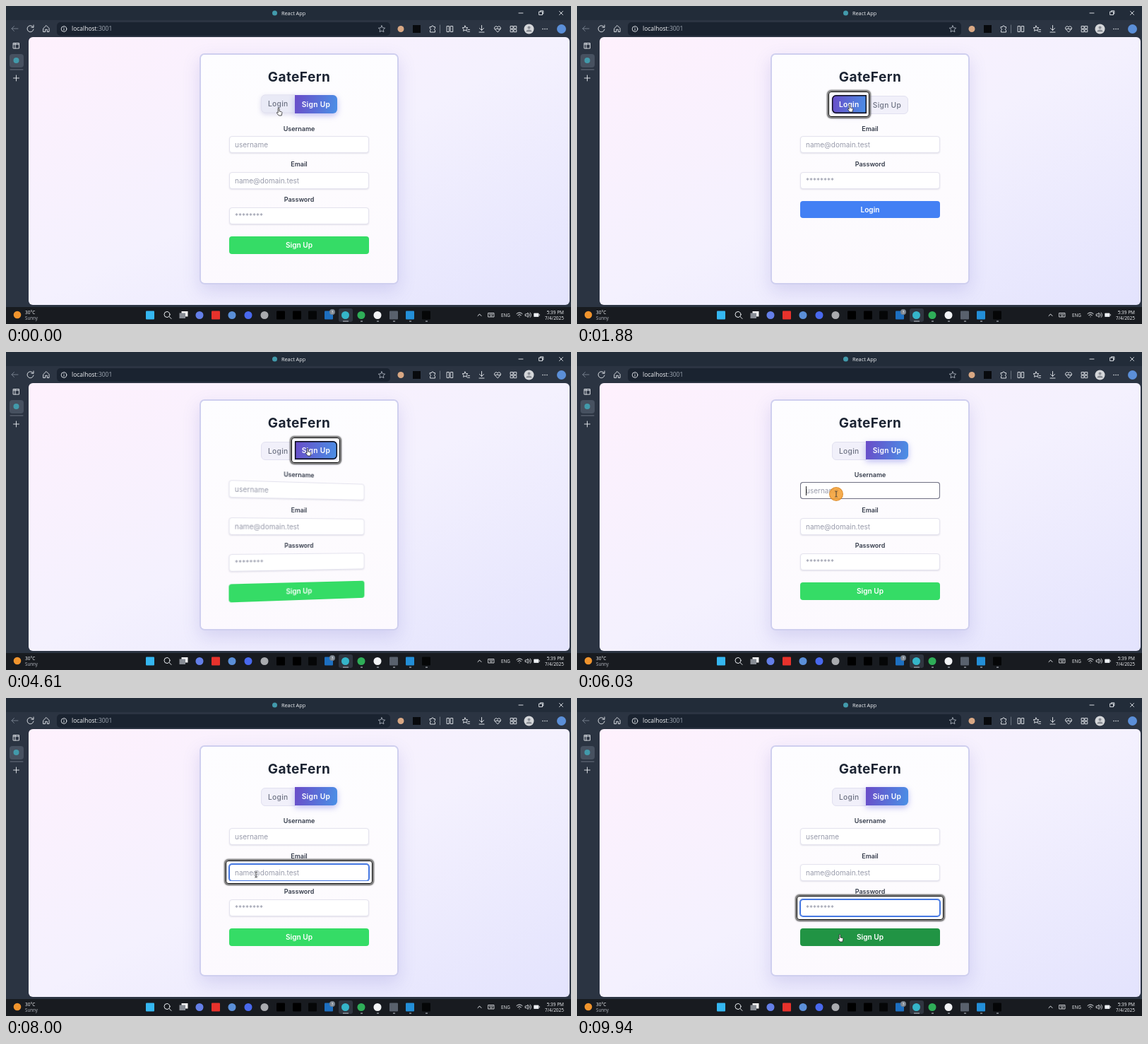
These frames come from a looping animation (800 px wide and 450 px high, 10000 ms). An HTML page:

```html
<!DOCTYPE html>
<html lang="en">
<head>
<meta charset="utf-8">
<title>React App</title>
<style>
html, body { margin: 0; width: 100%; height: 100%; overflow: hidden; background: #2b3442; }
#stage { position: relative; width: 800px; height: 450px; overflow: hidden; font-family: Inter, sans-serif; }
#stage div, #stage svg { position: absolute; box-sizing: border-box; }
#page { left: 32px; top: 44px; width: 766px; height: 379px; border-radius: 6px;
  background: linear-gradient(to bottom right, #fef1fd, #f4f1fe 50%, #e3e3fd); }
#card { left: 274px; top: 67px; width: 282px; height: 327px; border: 2.5px solid #cfcfef; border-radius: 7px;
  background: linear-gradient(#fdfdff, #fdfbfe 60%, #fcf9fe); box-shadow: 0 9px 24px rgba(95, 90, 190, .18); }
#title { left: 275px; top: 89px; width: 280px; line-height: 24px; text-align: center;
  font-size: 19px; font-weight: 700; letter-spacing: .45px; color: #1c2433; }
#tabs { isolation: isolate; }
.tab { top: 127px; height: 26px; line-height: 26px; text-align: center; font-size: 10.2px; font-weight: 500;
  letter-spacing: .3px; border: 1px solid #e2e1f0; }
.tab div { inset: -1px; border-radius: inherit; }
.fill { background: linear-gradient(100deg, #6a4cc8, #4a90e6); box-shadow: 0 3px 9px rgba(85, 85, 220, .38); }
.tab .word { line-height: 26px; }
.form { left: 316px; top: 160px; width: 198px; height: 200px; }
.label { width: 198px; line-height: 12px; text-align: center; font-size: 9px; font-weight: 600; color: #343b4a; }
.input { width: 198px; height: 24px; line-height: 22px; padding-left: 7px; border: 1px solid #e4e3ee; border-radius: 4px;
  background: #fff; font-size: 10px; color: #989bab; box-shadow: 0 1px 2px rgba(70, 70, 110, .14); }
.caret { left: 7px; top: 5px; width: 1px; height: 13px; background: #222; }
.send { width: 198px; height: 24.6px; line-height: 24.6px; border-radius: 4px; text-align: center; font-size: 10.1px;
  font-weight: 600; color: #fff; }
#ring { border: 1.6px solid #050505; border-radius: 4px;
  box-shadow: 0 0 0 .8px #aaa, 0 0 2px 2px #444, inset 0 0 0 3px #fff; }
#dot { width: 20px; height: 20px; margin: -10px; border-radius: 50%; background: rgba(244, 158, 48, .85);
  border: 1px solid rgba(205, 120, 20, .6); }
</style>
</head>
<body>
<div id="stage">
  <svg id="chrome" width="800" height="450" viewBox="0 0 800 450" fill="none" stroke-linecap="round" stroke-linejoin="round">
    <path fill="#2b3442" d="M0 0h800v450H0z"/>
    <path fill="#222c39" d="M0 0h800v20H0z"/>
    <path fill="#181b20" d="M0 426h800v24H0z"/>
    <rect x="72" y="23" width="472" height="19" rx="5" fill="#1a2330"/>
    <rect x="5" y="68" width="20" height="19" rx="4" fill="#475160"/>
    <path stroke="#7b8491" stroke-width=".8" d="M6 90h18M614.500 27v11"/>
    <g fill="#429aab"><circle cx="380.500" cy="10" r="3.500"/><circle cx="14.500" cy="77" r="4"/></g>
    <g stroke="#e8ebf0" stroke-width=".9">
      <path d="M726 10h6M755 8h4.500v4.500H755zM756.500 8V6.800h4.300V11h-1.300M783.500 7.500l5 5m0-5l-5 5"/>
      <path stroke="#7b8592" d="M17 32H8m3.500-3.500L8 32l3.500 3.500"/>
      <path d="M38.500 30a4.500 4.500 0 1 0 .5 3M39 27v3.200h-3.200"/>
      <path d="M53 31.500l4-4 4 4V36.500h-2.700v-3.200h-2.600v3.200H53z"/>
      <circle cx="82" cy="32.500" r="3.800"/><path d="M82 32v2.300m0-4v.1"/>
      <path stroke="#abb2bd" d="M532 27.800l1.400 3 3.300.4-2.400 2.200.6 3.300-2.900-1.600-2.900 1.600.6-3.300-2.400-2.200 3.300-.4z"/>
      <path d="M600.500 29.500h2a1.500 1.500 0 0 1 3 0h2v2.200a1.500 1.500 0 0 0 0 2.800V37h-7v-2.500a1.500 1.500 0 0 0 0-2.800z"/>
      <path d="M624.500 28.500h3v8h-3zM629.700 28.500h3v8h-3z"/>
      <path d="M650 28l1.200 2.500 2.700.3-2 1.900.5 2.700-2.400-1.300-2.400 1.300.5-2.700-2-1.900 2.700-.3zM654 33.500h2.500M653.500 36.200h3"/>
      <path d="M673.500 27.500v7m-3-3l3 3 3-3M670 37h7"/>
      <path d="M696 36.800l-4-4a2.500 2.500 0 0 1 4-3 2.500 2.500 0 0 1 4 3zM693 32.500h2l1-1.500 1.200 2.500.8-1h2"/>
      <path d="M714.500 28.500h3.500v3.500h-3.500zM714.500 33.200h3.500v3.500h-3.500zM719.300 33.200h3.500v3.500h-3.500zM719.300 28.500h3.500v3.500h-3.500z"/>
      <path stroke-width="1.500" d="M760 32.500h.1M763 32.500h.1M766 32.500h.1"/>
      <path d="M10.500 52.500h8v7.500h-8zM13 52.500v7.500M10.500 54.300h8M10.500 102h8m-4-4v8"/>
    </g>
    <circle cx="559" cy="32.500" r="4.500" fill="#d9a884"/>
    <rect x="576" y="27" width="11" height="11" fill="#080a0d"/>
    <circle cx="740.500" cy="32.500" r="7" fill="#d5d7da"/>
    <path fill="#8b8f96" d="M736.500 36.500a4 3 0 0 1 8 0z"/><circle cx="740.500" cy="30.500" r="2" fill="#8b8f96"/>
    <circle cx="786.500" cy="32.500" r="6.500" fill="#5b8fd8"/>
    <g font-family="Open Sans, sans-serif" fill="#f2f4f7" font-size="6.500">
      <text x="390" y="12.700" font-size="7.300">React App</text>
      <text x="93" y="35.400" font-size="8.500">localhost<tspan fill="#a2aab5">:3001</tspan></text>
      <text x="27" y="435.500">30°C</text><text x="27" y="443.500" fill="#b8bcc4" font-size="6.200">Sunny</text>
      <text x="701" y="439.800" font-size="6.300">ENG</text>
      <text x="790" y="435.500" text-anchor="end">5:39 PM</text><text x="790" y="443.500" text-anchor="end">7/4/2025</text>
    </g>
    <circle cx="16" cy="437" r="5.300" fill="#f0942d"/>
    <rect x="471" y="428" width="20" height="19" rx="3" fill="#303640"/>
    <g id="apps"></g>
    <g stroke="#eceff3" stroke-width="1">
      <circle cx="228" cy="436.500" r="4"/><path d="M231 439.500l3 3"/>
      <path d="M668 438.500l2.500-2.500 2.500 2.500"/>
      <path stroke-width=".8" d="M683 434.500h8v5.500h-8zM684.500 436.300h5M685.500 438.300h3"/>
      <path d="M723 435.500a5.500 5.500 0 0 1 8 0M724.700 437.500a3.500 3.500 0 0 1 4.600 0M727 439.800v.1"/>
      <path stroke-width=".8" d="M735.500 436h1.500l2-2v6.500l-2-2h-1.500zM740.800 435.500a2.500 2.500 0 0 1 0 3.500M742.200 434a4.500 4.500 0 0 1 0 6.500"/>
      <path fill="#eceff3" stroke-width=".8" d="M748 435h6v4.500h-6zM755.300 436.500v1.500"/>
    </g>
    <path fill="#f1f1f1" d="M248.500 432h9v7.500h-9z"/><path fill="#888d95" d="M245.500 434.500h8.500v7.500h-8.500z"/>
    <circle cx="462" cy="433" r="4" fill="#79838e"/>
    <text x="462" y="435.200" text-anchor="middle" font-size="6" fill="#fff" font-family="Open Sans, sans-serif">3</text>
    <path fill="#a3a8b0" d="M477 445.500h8v1.300h-8zM502 445.500h3v1.300h-3zM525 445.500h3v1.300h-3zM548 445.500h3v1.300h-3zM571 445.500h3v1.300h-3zM594 445.500h3v1.300h-3z"/>
  </svg>
  <div id="page"></div>
  <div id="card"></div>
  <div id="title">GateFern</div>
  <div id="tabs"></div>
  <div id="ring"></div>
  <div id="dot"></div>
  <svg id="cursor" width="16" height="18" viewBox="-8 -9 16 18" fill="#fff" stroke="#222" stroke-width=".8" stroke-linejoin="round">
    <path data-kind="hand" d="M-1.800-5.200c1-.9 1.800-.1 1.800.8V-1l2.800.6c.9.300 1.200.9 1 1.800L3.100 5H-.7L-3.500 1.600c-.5-.9.4-1.500 1.200-.9l.5.5z"/>
    <path data-kind="arrow" d="M-3-5.500v9.200l2.200-2 1.500 3.300 1.500-.7-1.500-3.200h3z"/>
    <path data-kind="beam" fill="none" stroke="#333" stroke-width=".9" d="M-1.700-4h1.200l.5.500.500-.5h1.200M0-3.500v7M-1.700 4h1.200l.5-.5.5.5h1.200"/>
  </svg>
</div>
<script>
const LOOP = 10000;
const $ = id => document.getElementById(id);
const stage = $('stage');
const clamp = v => Math.min(1, Math.max(0, v));
const ramp = (t, start, len) => clamp((t - start) / len);
const smooth = p => p * p * (3 - 2 * p);
const blend = (a, b, p) => `rgb(${a.map((v, i) => Math.round(v + (b[i] - v) * p))})`;

function box(parent, cls, text, style) {
  const el = document.createElement('div');
  el.className = cls;
  el.textContent = text;
  Object.assign(el.style, style);
  return parent.appendChild(el);
}

// Taskbar tiles: x, colour, round
const apps = [[204, '#35b7f1', 0], [274, '#647fe8', 1], [297, '#e7322c', 0], [320, '#5b8fd8', 1],
  [343, '#4969ee', 1], [366, '#a9abaf', 1], [389, '#000', 0], [412, '#000', 0], [434, '#050607', 0],
  [457, '#1d6fc0', 0], [480.5, '#35b5c9', 1], [503, '#2fae58', 1], [526, '#f2f3f5', 1],
  [549, '#59616d', 0], [572, '#238fd8', 0], [595, '#050607', 0]];
$('apps').innerHTML = apps.map(([x, color, round]) => {
  const r = round ? 5.5 : 6;
  return `<rect x="${x - r}" y="${437.5 - r}" width="${2 * r}" height="${2 * r}" rx="${round ? r : 1}" fill="${color}"/>`;
}).join('');

function makeForm(names, word, color) {
  const form = box(stage, 'form', '');
  const hints = { Username: 'username', Email: 'name@domain.test', Password: '********' };
  const inputs = names.map((name, i) => {
    const y = 24.2 + i * 50.4;
    box(form, 'label', name, { top: y - 16.7 + 'px' });
    const el = box(form, 'input', hints[name], { top: y + 'px' });
    return { el, caret: box(el, 'caret', '') };
  });
  const send = box(form, 'send', word, { top: 14.8 + names.length * 50.4 + 'px', background: color });
  return { form, inputs, send };
}
const login = makeForm(['Email', 'Password'], 'Login', '#4380f4');
const signup = makeForm(['Username', 'Email', 'Password'], 'Sign Up', '#35dc66');

function makeTab(word, x, w, radius) {
  const el = box($('tabs'), 'tab', '', { left: x + 'px', width: w + 'px', borderRadius: radius });
  return { el, fill: box(el, 'fill', ''), word: box(el, 'word', word) };
}
const tabs = [makeTab('Login', 361, 48.5, '6px 0 0 6px'), makeTab('Sign Up', 409, 59.8, '0 6px 6px 0')];
['tabs', 'ring', 'dot', 'cursor'].forEach(id => stage.append($(id)));

const TO_LOGIN = 1000, TO_SIGNUP = 3930, HALF = 390;
// Focus changes: time, place and size, tab or field index
const focuses = [
  { at: TO_LOGIN, rect: [361, 126, 48.5, 26], tab: 0 },
  { at: TO_SIGNUP, rect: [409, 126, 59.8, 26], tab: 1 },
  { at: 5990, rect: [316, 184, 198, 24], field: 0 },
  { at: 7490, rect: [316, 234.6, 198, 24], field: 1 },
  { at: 9000, rect: [316, 285, 198, 24], field: 2 }
];
// Pointer path: time, x, y
const path = [[0, 387, 150], [30, 387, 150], [210, 387, 146], [700, 387, 146], [1000, 387, 145], [2700, 387, 145],
  [3210, 413, 139], [3600, 428, 142], [5200, 428, 142], [5850, 367, 201], [6900, 367, 201],
  [7350, 354, 250], [8550, 354, 250], [8900, 352, 297], [9200, 352, 297], [9580, 360, 316], [9880, 373, 340], [LOOP, 373, 340]];

function pointer(t) {
  const i = Math.max(1, path.findIndex(k => k[0] > t));
  const [a, b] = [path[i - 1], path[i]];
  const p = smooth(ramp(t, a[0], b[0] - a[0]));
  return [a[1] + (b[1] - a[1]) * p, a[2] + (b[2] - a[2]) * p];
}

function pointerKind(y) {
  if (y < 157 || y > 329) return 'hand';
  return [184, 235, 285].some(top => y > top && y < top + 24) ? 'beam' : 'arrow';
}

function flip(t) {
  for (const start of [TO_LOGIN, TO_SIGNUP]) {
    const p = (t - start) / HALF;
    if (p >= 0 && p < 1) return -90 * smooth(p);
    if (p >= 1 && p < 2) return 90 * (1 - smooth(p - 1));
  }
  return 0;
}

function drawTabs(t, focus) {
  const toLogin = ramp(t, TO_LOGIN, 200) - ramp(t, TO_SIGNUP, 200);
  const hover = [t < TO_LOGIN ? 1 : 0, t < TO_SIGNUP ? ramp(t, 3200, 250) : 0];
  tabs.forEach(({ el, fill, word }, i) => {
    const on = i ? 1 - toLogin : toLogin;
    el.style.transform = `translateY(${-Math.max(on, hover[i] * 1.6)}px)`;
    el.style.background = blend([241, 240, 250], [233, 234, 246], hover[i]);
    el.style.boxShadow = `0 2px 6px rgba(90,90,170,${hover[i] * .2})`;
    el.style.zIndex = on > .5 ? 1 : 0;
    fill.style.opacity = on;
    word.style.color = blend([108, 113, 130], [255, 255, 255], on);
    word.style.fontWeight = on > .5 ? 600 : 500;
    word.style.boxShadow = focus && focus.tab === i ? 'inset 0 0 0 1.4px #0a0a14' : 'none';
  });
}

function drawFields(t, focus) {
  signup.inputs.forEach(({ el, caret }, i) => {
    const on = focus && focus.field === i;
    const age = on ? t - focus.at : 0;
    const p = ramp(age, 40, 130);
    const color = blend([112, 113, 130], [69, 120, 226], p);
    el.style.borderColor = on ? color : '';
    el.style.boxShadow = on ? `0 0 0 ${p}px ${color}` : '';
    caret.style.visibility = on && age % 1000 < 500 ? 'visible' : 'hidden';
  });
  signup.send.style.background = blend([53, 220, 102], [33, 148, 68], ramp(t, 9690, 180));
}

function drawRing(t, focus) {
  const ring = $('ring');
  if (!focus) return void (ring.style.opacity = 0);
  const age = t - focus.at;
  const [x, y, w, h] = focus.rect;
  const pad = 4.6;
  Object.assign(ring.style, {
    left: x - pad + 'px', top: y - pad + 'px', width: w + 2 * pad + 'px', height: h + 2 * pad + 'px',
    opacity: ramp(age, 60, 100) - ramp(age, 1100, 600)
  });
}

function draw(t) {
  const focus = focuses.filter(f => f.at <= t).pop();
  const onLogin = t >= TO_LOGIN + HALF && t < TO_SIGNUP + HALF;
  const turn = flip(t);
  [login, signup].forEach(({ form, inputs }, i) => {
    form.style.visibility = onLogin === !i ? 'visible' : 'hidden';
    form.style.transform = turn ? `perspective(670px) rotateY(${turn}deg)` : 'none';
    inputs.forEach(({ caret }) => caret.style.visibility = 'hidden');
  });
  drawTabs(t, focus);
  if (!onLogin) drawFields(t, focus);
  drawRing(t, focus);

  const [x, y] = pointer(t);
  const kind = pointerKind(y);
  $('cursor').style.transform = `translate(${x - 8}px, ${y - 9}px)`;
  for (const el of $('cursor').children) el.style.display = el.dataset.kind === kind ? '' : 'none';
  const age = focus ? t - focus.at : LOOP;
  $('dot').style.transform = `translate(${x}px, ${y}px)`;
  $('dot').style.opacity = 1 - ramp(age, 120, 150);
}

const begin = performance.now();
function tick() {
  draw((performance.now() - begin) % LOOP);
  requestAnimationFrame(tick);
}
tick();
</script>
</body>
</html>
```
